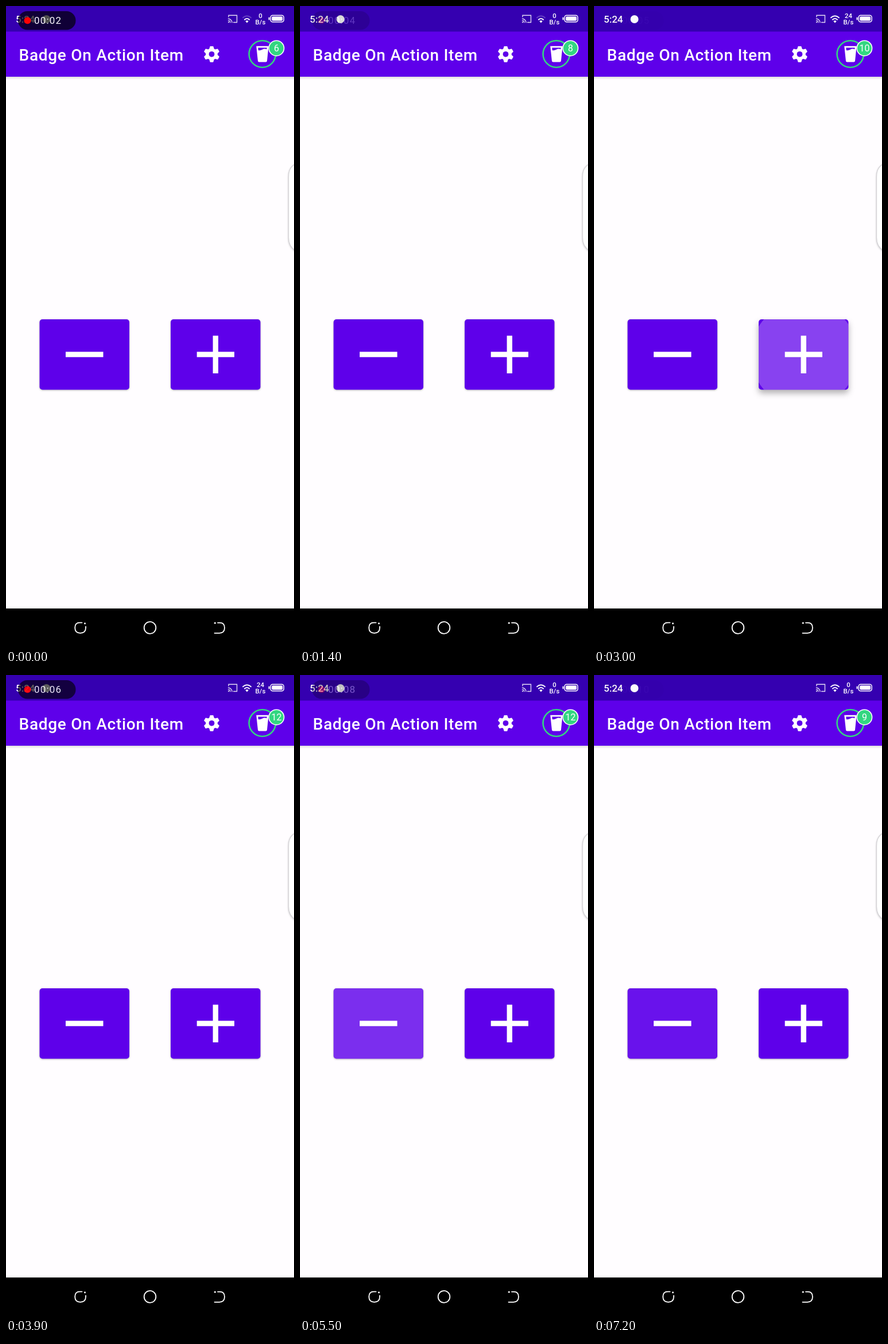
These frames come from a looping animation (502 px wide and 1115 px high, 7300 ms). An HTML page:

```html
<!DOCTYPE html>
<html lang="en">
<head>
<meta charset="utf-8">
<title>Badge On Action Item</title>
<style>
  html, body { margin: 0; width: 100%; height: 100%; overflow: hidden; background: #fffdff; }
  svg { display: block; font-family: Roboto, sans-serif; fill: #fff; }
  .mid { text-anchor: middle; }
  .line { fill: none; stroke: #fff; stroke-linecap: round; }
</style>
</head>
<body>
<svg width="502" height="1115" viewBox="0 0 502 1115">
  <defs>
    <linearGradient id="fall" x2="0" y2="1">
      <stop stop-color="#000" stop-opacity=".13"/>
      <stop offset="1" stop-color="#000" stop-opacity="0"/>
    </linearGradient>
    <clipPath id="clipMinus"><rect x="58.5" y="545" width="156.5" height="122.5" rx="5"/></clipPath>
    <clipPath id="clipPlus"><rect x="287" y="545" width="156.5" height="122.5" rx="5"/></clipPath>
  </defs>

  <rect width="502" height="1115" fill="#fffdff"/>
  <rect y="123" width="502" height="5" fill="url(#fall)"/>
  <rect y="44" width="502" height="79" fill="#5e00ea"/>
  <rect width="502" height="44.5" fill="#3500b0"/>

  <!-- status bar -->
  <text x="17" y="29" font-size="17" font-weight="500">5:24</text>
  <circle cx="70.5" cy="23" r="7"/>
  <g class="line" stroke-width="1.4" opacity=".85">
    <path d="M388 19V16.2H402.5V28.5H396.5"/>
    <path d="M387.5 22.3A6.5 6.5 0 0 1 394 28.7M387.5 25.4A3.3 3.3 0 0 1 390.8 28.7"/>
  </g>
  <circle cx="388" cy="28.3" r="1"/>
  <g class="line" stroke-width="1.8">
    <path id="wifi" d="M413 20.3Q420 14.3 427 20.3"/>
    <path d="M415.8 23.7Q420 20 424.2 23.7"/>
  </g>
  <path d="M417.3 26.2Q420 24.4 422.7 26.2L420 29.5Z"/>
  <g class="mid" font-size="11.5" font-weight="500">
    <text id="speed" x="443.5" y="21"></text>
    <text x="443.5" y="32">B/s</text>
  </g>
  <rect x="461.2" y="16.2" width="23" height="11.6" rx="3.5" class="line" stroke-width="1.5"/>
  <rect x="463.3" y="18.3" width="18.8" height="7.4" rx="1.8"/>
  <rect x="457.6" y="19.5" width="2" height="5" rx="1"/>

  <g id="pill">
    <rect x="21" y="9" width="100.5" height="32.5" rx="16" fill="#000" opacity=".7"/>
    <circle cx="37.5" cy="25.3" r="6" fill="#f00"/>
    <text id="clock" x="49" y="31.3" font-size="17" letter-spacing="1.2"></text>
  </g>

  <!-- toolbar -->
  <text x="22.5" y="94.7" font-size="28" font-weight="500" letter-spacing=".7">Badge On Action Item</text>
  <g id="gear" transform="translate(358.5 83.8)">
    <circle r="10.3"/>
    <circle r="4.9" fill="#5e00ea"/>
  </g>
  <circle cx="446.8" cy="83.5" r="23.2" fill="none" stroke="#33d681" stroke-width="2.6"/>
  <path d="M436.3 69.8H457.7L455 95.5Q454.8 97.6 452.8 97.6H441.2Q439.2 97.6 439 95.5Z"/>
  <path d="M439.3 72.4H454.8L454.4 75.2Q450 73.8 446.8 75.8T439.8 77Z" fill="#5e00ea"/>
  <circle cx="471.4" cy="73.4" r="13.2" fill="#33d681" stroke="#fff" stroke-width="1.6"/>
  <text id="badge" class="mid" x="471.4" y="79.2" font-size="16"></text>

  <!-- edge handle -->
  <path d="M504 275Q492.5 281 492.5 297V403Q492.5 418 504 425Z" stroke="#d3d1d5" stroke-width="1.3"
        style="filter:drop-shadow(0 1px 1.5px #0003)"/>

  <!-- buttons -->
  <rect id="baseMinus" x="58.5" y="545" width="156.5" height="122.5" rx="5" fill="#5e00ea"/>
  <rect id="basePlus" x="287" y="545" width="156.5" height="122.5" rx="5" fill="#5e00ea"/>
  <g clip-path="url(#clipMinus)"><circle id="rippleMinus" cx="136.7" cy="606.2"/></g>
  <g clip-path="url(#clipPlus)"><circle id="ripplePlus" cx="366.5" cy="606.2"/></g>
  <path d="M104 601.5H169.5V610.7H104ZM332.7 601.5H360.6V573.4H370V601.5H398V610.7H370V639H360.6V610.7H332.7Z"/>

  <!-- navigation bar -->
  <rect y="1048" width="502" height="67" fill="#000"/>
  <g class="line" stroke-width="1.8">
    <path d="M132.5 1072.6H128.5Q120.2 1072.6 120.2 1081.5Q120.2 1090.8 129.5 1090.8Q139 1090.8 139 1081.5V1079.5"/>
    <circle cx="251" cy="1081.5" r="10.3"/>
    <path d="M369 1072.8H373Q381 1072.8 381 1081.6Q381 1090.8 372 1090.8H363.5"/>
  </g>
  <circle cx="137.5" cy="1074" r="1.5"/>
  <circle cx="364.3" cy="1073.2" r="1.5"/>
</svg>
<script>
const LOOP = 7300;
const CLICK = 200;              // delay from touch to counter change
const taps = {
  Plus: [250, 850, 1500, 2170, 2830, 3300, 4200],
  Minus: [5175, 5770, 6270, 6770]
};
const $ = id => document.getElementById(id);
const clamp = v => Math.max(0, Math.min(1, v));

for (let i = 0; i < 6; i++) {
  $('gear').insertAdjacentHTML('afterbegin',
    `<path d="M-4.4 -8.5L-3 -13.3Q-2.9 -13.9 -2.2 -13.9H2.2Q2.9 -13.9 3 -13.3L4.4 -8.5Z" transform="rotate(${i * 60})"/>`);
}

function drawButton(name, t) {
  const start = taps[name].filter(p => p <= t).pop();
  const age = start === undefined ? 1e4 : t - start;
  const grow = 1 - (1 - clamp(age / 250)) ** 2;
  const alpha = .26 * clamp(age / 75) * clamp((500 - age) / 250);
  const lift = Math.min(clamp(age / 100), clamp((300 - age) / 100));
  const ripple = $('ripple' + name);
  ripple.setAttribute('r', 30 + 71 * grow - 8 * grow * (1 - grow));
  ripple.setAttribute('opacity', alpha);
  $('base' + name).style.filter =
    `drop-shadow(0 ${1.5 + 5 * lift}px ${1.5 + 4 * lift}px rgba(0,0,0,${.27 + .03 * lift}))`;
}

function draw(t) {
  const clicks = name => taps[name].filter(p => p + CLICK <= t).length;
  $('badge').textContent = 6 + clicks('Plus') - clicks('Minus');
  drawButton('Plus', t);
  drawButton('Minus', t);

  $('clock').textContent = '00:' + String(Math.floor(2 + (t + 900) / 1000)).padStart(2, '0');
  $('pill').setAttribute('opacity', .5 + .5 * Math.cos(Math.PI * (t - 100) / 1000));
  $('speed').textContent = t >= 2100 && t < 5100 ? 24 : 0;
  $('wifi').setAttribute('opacity', t < 2200 ? .25 : 1);
}

const origin = performance.now();
function frame() {
  draw((performance.now() - origin) % LOOP);
  requestAnimationFrame(frame);
}
frame();
</script>
</body>
</html>
```
